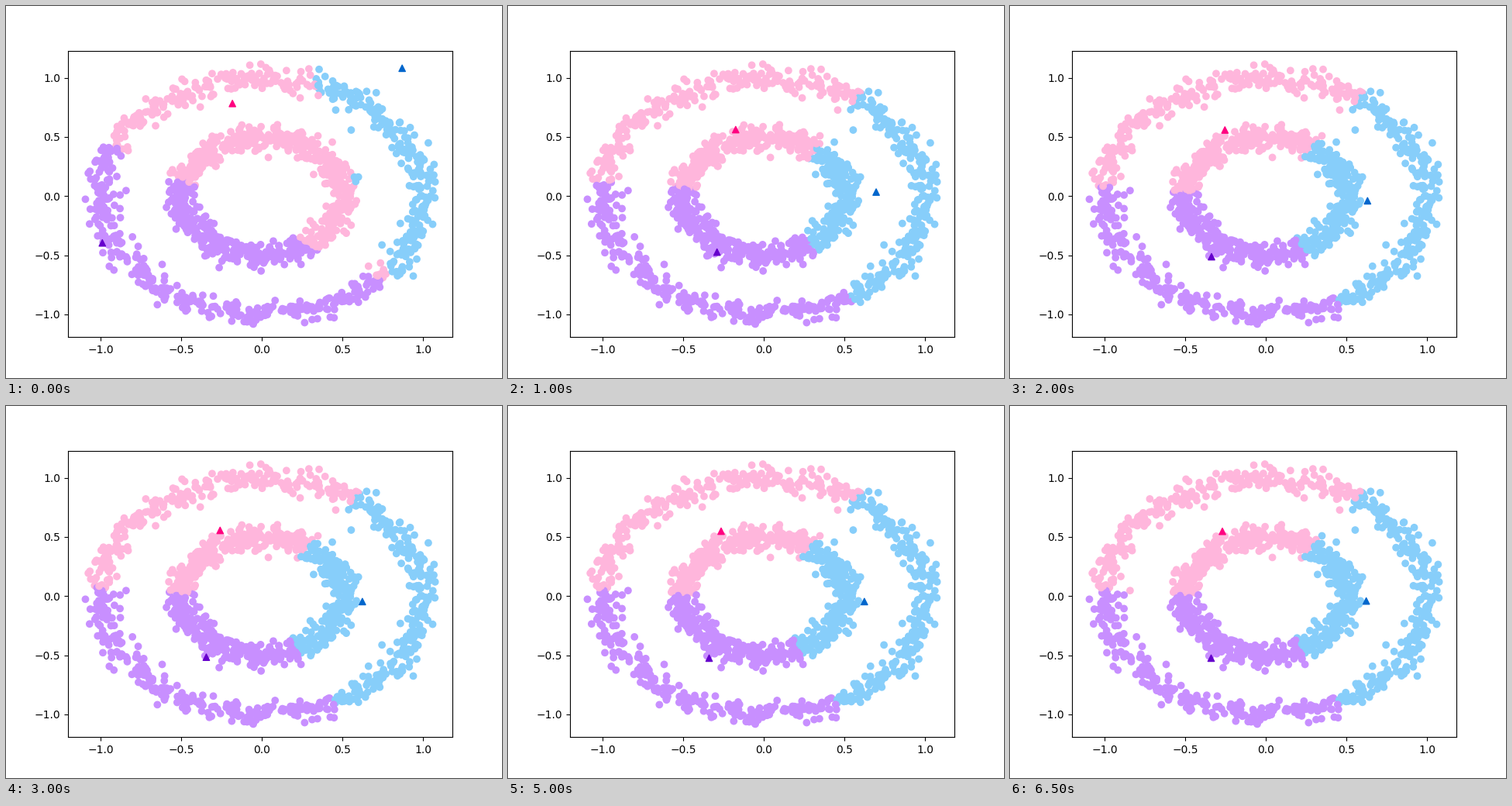
Animation of 640x480 px, one loop 7.5 s. Source, as a matplotlib script:

```python
import numpy as np
import matplotlib.pyplot as plt
from matplotlib.animation import FuncAnimation

LIGHT = np.array(["#ffb6dc", "#87cefa", "#c88fff"])
DARK = ["#ff0080", "#0066cc", "#6600cc"]
START = np.array([[-.183, .783], [.870, 1.081], [-.990, -.396]])
PER_RING, NOISE = 750, 0.05
FRAMES, INTERVAL = 15, 500

# Stage position of the data zero and pixels per data unit
ZERO_X, ZERO_Y = 330.2, 245.28
SCALE_X, SCALE_Y = 208, 152.6


def make_rings(rng):
    """Two noisy concentric rings in shuffled order."""
    angle = np.linspace(0, 2 * np.pi, PER_RING, endpoint=False)
    ring = np.column_stack([np.cos(angle), np.sin(angle)])
    pts = np.vstack([ring, 0.5 * ring])
    order = np.arange(len(pts))
    rng.shuffle(order)
    return pts[order] + rng.normal(scale=NOISE, size=pts.shape)


def nearest(centers):
    dist = np.linalg.norm(points[:, None] - centers, axis=2)
    return dist.argmin(axis=1)


def k_means(centers, steps):
    """Centroids at every step; each moves to the mean of its cluster."""
    path = [centers]
    for _ in range(steps - 1):
        label = nearest(path[-1])
        path.append(np.array([points[label == k].mean(axis=0)
                              for k in range(len(centers))]))
    return path


points = make_rings(np.random.RandomState(0))
path = k_means(START, FRAMES - 1)

fig, ax = plt.subplots(figsize=(6.4, 4.8), dpi=100)
dots = ax.scatter(*points.T)
marks = ax.scatter(*START.T, marker="^", c=DARK)
ax.set_xlim((80 - ZERO_X) / SCALE_X, (576 - ZERO_X) / SCALE_X)
ax.set_ylim((ZERO_Y - 427.2) / SCALE_Y, (ZERO_Y - 57.6) / SCALE_Y)
ax.set_xticks(np.arange(-1, 1.1, 0.5))
ax.set_yticks(np.arange(-1, 1.1, 0.5))


def update(i):
    centers = path[min(i, len(path) - 1)]
    dots.set_color(LIGHT[nearest(centers)])
    marks.set_offsets(centers)
    return dots, marks


anim = FuncAnimation(fig, update, frames=FRAMES, interval=INTERVAL,
                     repeat=True, repeat_delay=0)
plt.show()
```
